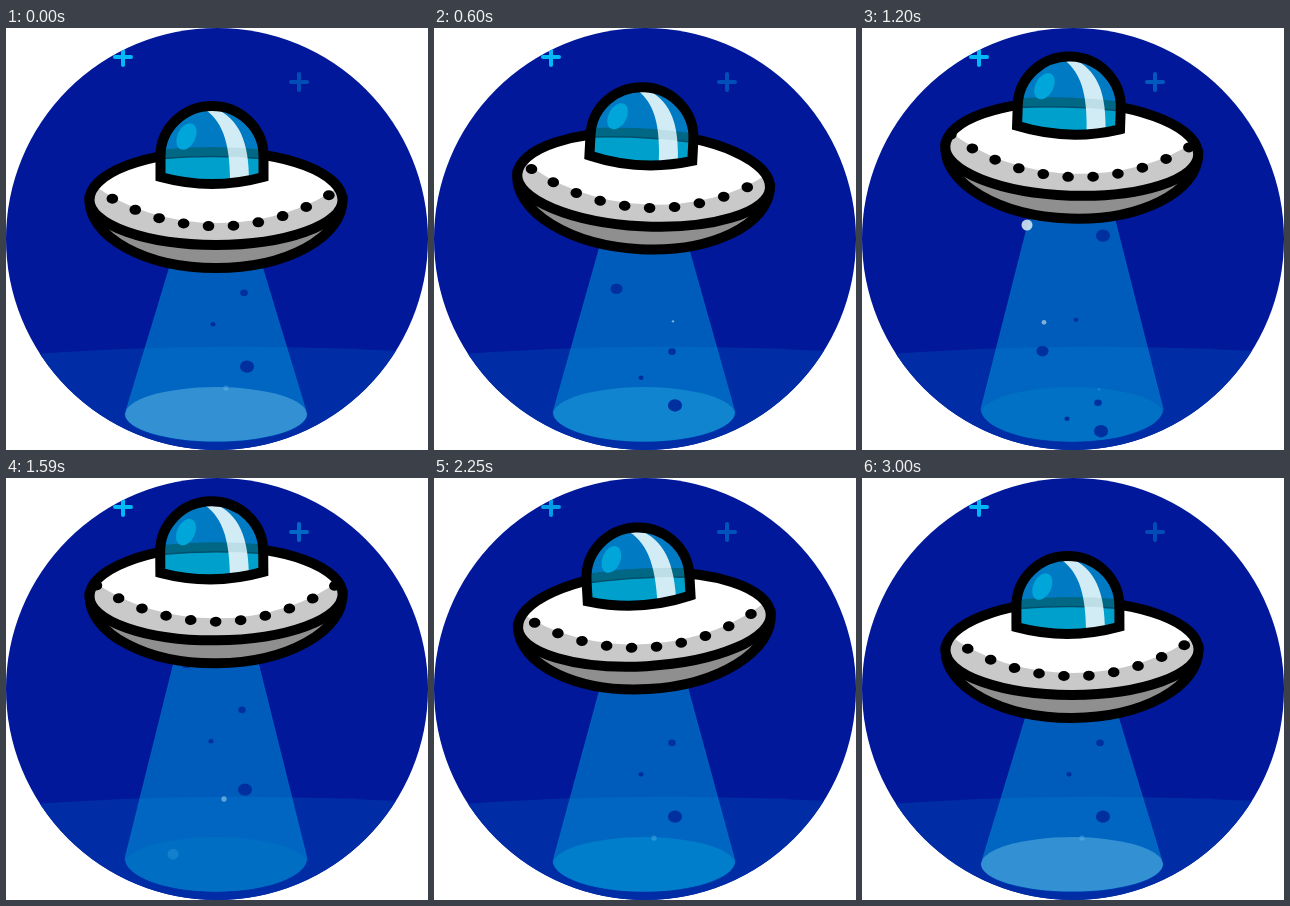
Animation of 422 by 422 pixels, one loop 3030 ms. Source, as an HTML page with a canvas:

```html
<!DOCTYPE html>
<html lang="en">
<head>
<meta charset="utf-8">
<title>Flying saucer</title>
<style>
html, body { margin: 0; width: 100%; height: 100%; overflow: hidden; background: #fff; }
canvas { display: block; width: 422px; height: 422px; }
</style>
</head>
<body>
<canvas id="stage" width="422" height="422"></canvas>
<script>
const ctx = document.getElementById('stage').getContext('2d');
const LOOP = 3030, STEP = 30, EMIT = 750;

const disc = new Path2D('M83.5 172A126.5 48.5 0 0 1 336.5 172A126.5 45 0 0 1 83.5 172Z');
const hull = new Path2D('M83.5 172A126.5 68 0 0 0 336.5 172Z');
const discTop = new Path2D('M80 156H86.5A170 121 0 0 0 336.5 156H342V100H80Z');
const dome = new Path2D('M154.5 149V128A51.5 50 0 0 1 257.5 128V149Q206 163 154.5 149Z');
const domeBase = new Path2D('M150 131Q206 126 262 131V165H150Z');
const domeBand = new Path2D('M150 122Q206 116 262 122V131Q206 126 150 131Z');
const domeLine = new Path2D('M150 131Q206 126 262 131');
const shine = new Path2D('M197 80C216 92 225 114 224 160H243C244 114 234 92 209 80Z');
const ground = new Path2D('M0 328Q215 311 422 325V422H0Z');

// Dark bubbles ease in and out: x, radius, start, angular speed
const darkBubbles = [
  [238, 3.5, 205, .0033],
  [207, 2.4, 255, .0031],
  [241, 6.5, 303, .00262],
  [182.5, 5.6, 76, .0035],
  [216, 2.2, 57, .004]
];
// Light bubbles speed up and brighten: x, radius, start
const lightBubbles = [[167, 5.5, -14], [184, 2.4, 160], [220, 2.7, 605], [239, 1.2, 308]];

function fill(path, color) {
  ctx.fillStyle = color;
  ctx.fill(path);
}

function outline(path, color = '#000', width = 10) {
  ctx.strokeStyle = color;
  ctx.lineWidth = width;
  ctx.stroke(path);
}

function oval(x, y, rx, ry, color, turn = 0) {
  ctx.fillStyle = color;
  ctx.beginPath();
  ctx.ellipse(x, y, rx, ry, turn, 0, 2 * Math.PI);
  ctx.fill();
}

function clipped(path, draw) {
  ctx.save();
  ctx.clip(path);
  draw();
  ctx.restore();
}

const bump = (t, mid, width) => Math.exp(-(((t - mid) / width) ** 2));

function star(x, y, alpha) {
  ctx.lineCap = 'round';
  outline(new Path2D(`M${x - 8} ${y}h16M${x} ${y - 8}v16`), `rgba(0,185,245,${alpha})`, 4);
  ctx.lineCap = 'butt';
}

function beam(lift, glow) {
  const top = 160 - lift, base = 386 - lift * .11;
  const cone = new Path2D(
    `M187.5 ${top}L119 ${base}A91 ${413.5 - base} 0 0 0 301 ${base}L232.5 ${top}Z`);
  fill(cone, 'rgba(0,160,221,.5)');
  outline(cone, 'rgba(0,160,221,.25)', 1);
  clipped(cone, () => oval(210, 386.3, 91, 27.2,
    `rgb(${51 * Math.max(0, glow)},${127 + 17 * glow},${203 + 8 * glow})`));
}

// Calls draw(age, x shift) for every bubble of one emitter still in the air
function emit(t, start, minAge, maxAge, draw) {
  for (let k = -2; k < 4; k++) {
    const age = t - start - EMIT * k;
    if (age > minAge && age < maxAge) draw(age, k === 1 ? -2 : 0);
  }
}

function bubbles(t) {
  for (const [x, r, start, speed] of darkBubbles) {
    emit(t, start, .28 / speed, Math.PI / speed, (age, dx) => {
      const y = 412 - 120 * (1 - Math.cos(age * speed));
      oval(x + dx, y, r * 1.08, r * .95, '#0030a0');
    });
  }
  for (const [x, r, start] of lightBubbles) {
    emit(t, start, 0, 495, (age, dx) => {
      const y = 412 - .31 * age - .00033 * age * age;
      const tint = Math.min(1, age / 250);
      oval(x + dx, y, r, r, `rgba(${210 * tint},${160 + 70 * tint},240,${Math.min(.9, age / 480)})`);
    });
  }
}

// Rivets roll along a shallow arc, evenly spaced
function rivets(t) {
  const gap = 25, roll = 1.757 * t / STEP % gap;
  for (let s = -134 - roll; s < 150; s += gap) {
    const a = s / 235;
    oval(211.5 + 235 * Math.sin(a), 198.3 - 260 * (1 - Math.cos(a)), 5.8, 5, '#000');
  }
}

function saucer(t, lift, tilt) {
  ctx.save();
  ctx.translate(210, 165 - lift);
  ctx.rotate(tilt);
  ctx.translate(-210, -165);

  fill(hull, '#8f8f8f');
  outline(hull);
  fill(disc, '#c9c9c9');
  clipped(disc, () => {
    fill(discTop, '#fff');
    rivets(t);
  });
  outline(disc);

  fill(dome, '#007ac2');
  clipped(dome, () => {
    fill(domeBase, '#00a0cc');
    fill(domeBand, '#006888');
    outline(domeLine, '#004f6c', 1.5);
    fill(shine, '#d2ecf6');
    fill(domeBand, 'rgba(0,104,100,.1)');
    oval(180.5, 108.5, 9, 14, '#00a5da', .45);
  });
  outline(dome);
  ctx.restore();
}

function draw(t) {
  const angle = 2 * Math.PI * t / LOOP, glow = Math.cos(angle);
  const lift = 27.5 * (1 - glow);
  ctx.clearRect(0, 0, 422, 422);
  const planet = new Path2D();
  planet.arc(211, 211, 211, 0, 2 * Math.PI);
  clipped(planet, () => {
    ctx.fillStyle = '#001899';
    ctx.fillRect(0, 0, 422, 422);
    fill(ground, '#002da5');
    star(117, 29, 1 - .3 * bump(t, 2480, 300));
    star(293, 54, .33 + .17 * bump(t, 1650, 500));
    beam(lift, glow);
    bubbles(t);
    saucer(t, lift, Math.sin(angle) * .056);
  });
}

function tick() {
  draw(Math.floor(performance.now() % LOOP / STEP) * STEP);
  requestAnimationFrame(tick);
}
tick();
</script>
</body>
</html>
```
